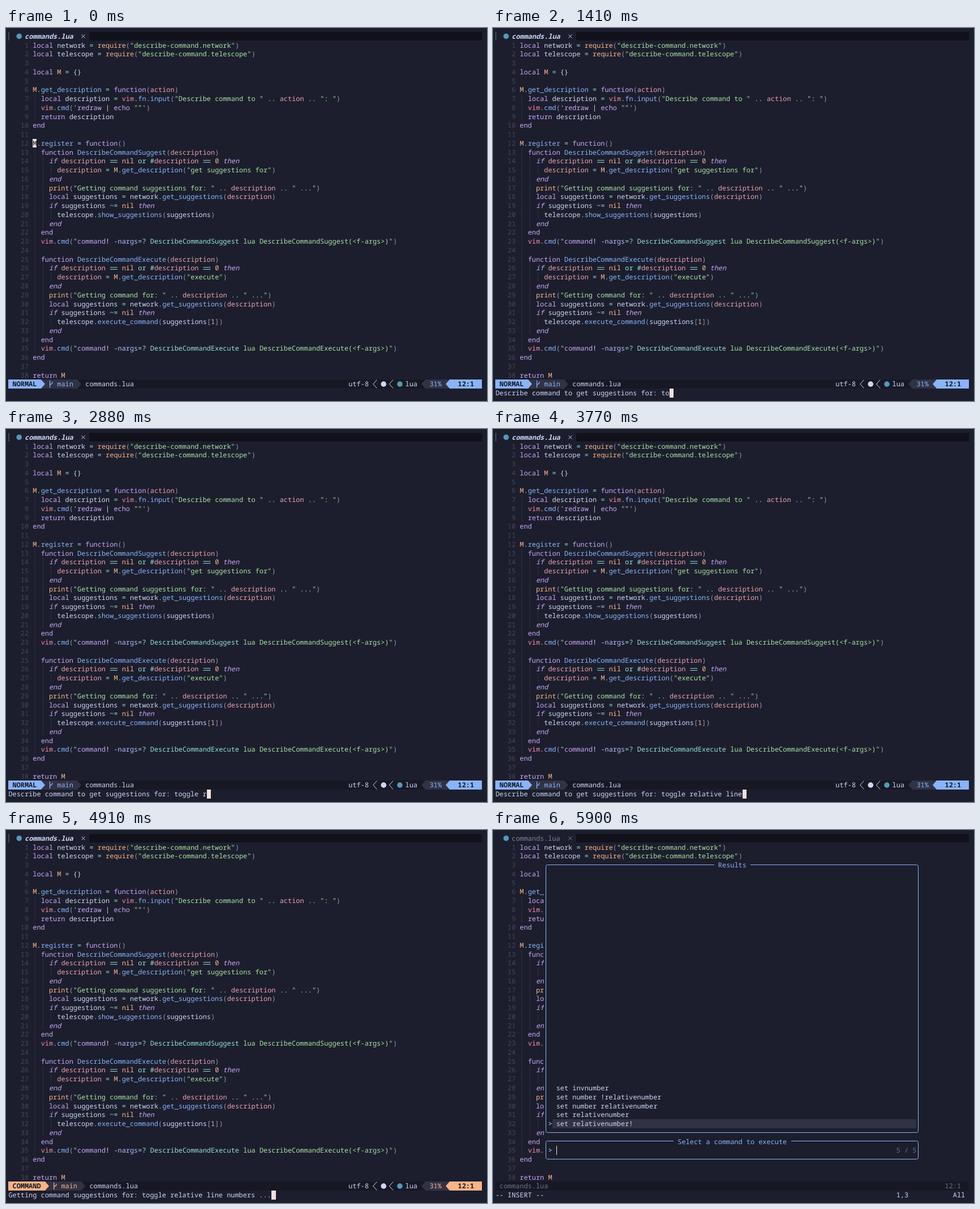
An HTML page for the animation above (8 s loop, 850x659 px).

```html
<!DOCTYPE html>
<html lang="en">
<head>
<meta charset="utf-8">
<title>Describe command</title>
<style>
  html, body { margin: 0; height: 100%; overflow: hidden; background: #1c1e2d; }
  svg { display: block; }
  text { font: 11.923px "Noto Sans Mono", "DejaVu Sans Mono", monospace; white-space: pre; text-rendering: geometricPrecision; }
  .b { font-weight: 600; }
  .i { font-style: italic; }
</style>
</head>
<body>
<svg id="stage" width="850" height="659" viewBox="0 0 850 659"></svg>
<script>
const C = {
  base: '#1c1e2d', mantle: '#181825', crust: '#11111b', surface: '#313244', number: '#45475a',
  dim: '#6c7086', gray: '#7f849c', punct: '#9399b2', text: '#cdd6f4', mauve: '#cba6f7',
  lavender: '#b4befe', blue: '#89b4fa', green: '#a6e3a1', peach: '#fab387', red: '#f38ba8',
  teal: '#94e2d5', maroon: '#eba0ac', cursor: '#f5e0dc', moon: '#519aba'
};
const LOOP = 8000, W = 7.154, H = 15.757, COLS = 117, STATUS = 39, CMD = 40;
const X = col => 4.4 + col * W;
const Y = row => 6.65 + row * H;

const CODE = `local network = require("describe-command.network")
local telescope = require("describe-command.telescope")

local M = {}

M.get_description = function(action)
  local description = vim.fn.input("Describe command to " .. action .. ": ")
  vim.cmd('redraw | echo ""')
  return description
end

M.register = function()
  function DescribeCommandSuggest(description)
    if description == nil or #description == 0 then
      description = M.get_description("get suggestions for")
    end
    print("Getting command suggestions for: " .. description .. " ...")
    local suggestions = network.get_suggestions(description)
    if suggestions ~= nil then
      telescope.show_suggestions(suggestions)
    end
  end
  vim.cmd("command! -nargs=? DescribeCommandSuggest lua DescribeCommandSuggest(<f-args>)")
  
  function DescribeCommandExecute(description)
    if description == nil or #description == 0 then
      description = M.get_description("execute")
    end
    print("Getting command for: " .. description .. " ...")
    local suggestions = network.get_suggestions(description)
    if suggestions ~= nil then
      telescope.execute_command(suggestions[1])
    end
  end
  vim.cmd("command! -nargs=? DescribeCommandExecute lua DescribeCommandExecute(<f-args>)")
end

return M`.split('\n');

const PROMPT = 'Describe command to get suggestions for: ';
const REQUEST = 'toggle relative line numbers';
const WAITING = `Getting command suggestions for: ${REQUEST} ...`;
const RESULTS = ['set invnumber', 'set number !relativenumber', 'set number relativenumber',
  'set relativenumber', 'set relativenumber!'];

// [time, characters typed]
const TYPING = [[740, 0], [1410, 2], [1570, 3], [1730, 5], [1890, 6], [1970, 7], [2880, 8],
  [2960, 10], [3130, 11], [3210, 13], [3370, 14], [3450, 15], [3530, 17], [3690, 19], [3770, 20],
  [3930, 21], [4010, 23], [4170, 24], [4250, 25], [4500, 28]];

const escape = s => s.replace(/&/g, '&amp;').replace(/</g, '&lt;');
const text = (col, row, s, color = C.text, cls = '') =>
  `<text x="${X(col)}" y="${Y(row) + 12.16}" fill="${color}" class="${cls}">${escape(s)}</text>`;
const rect = (x, y, w, h, color) =>
  `<rect x="${x}" y="${y}" width="${w}" height="${h}" fill="${color}"/>`;
const dot = (x, row, color) => `<circle cx="${x}" cy="${Y(row) + 8}" r="4.8" fill="${color}"/>`;
const line = (d, color, width = 1) =>
  `<path d="${d}" fill="none" stroke="${color}" stroke-width="${width}"/>`;

// Cell backgrounds sit on whole pixels
const px = col => Math.round(X(col)), py = row => Math.round(Y(row));
const cells = (col, row, cols, rows, color) =>
  rect(px(col), py(row), px(col + cols) - px(col), py(row + rows) - py(row), color);
const cursor = (col, row) => cells(col, row, 1, 1, C.cursor);

// Solid arrow head filling one status line cell
function arrow(col, color, left) {
  const [from, to] = left ? [px(col + 1), px(col)] : [px(col), px(col + 1)];
  const top = py(STATUS), bottom = py(STATUS + 1);
  return `<path d="M${from} ${top}L${to} ${(top + bottom) / 2}L${from} ${bottom}Z" fill="${color}"/>`;
}

function chevron(col) {
  const y = Y(STATUS);
  return line(`M${X(col + 1)} ${y + 0.5}L${X(col) + 0.5} ${y + H / 2}L${X(col + 1)} ${y + H - 0.5}`, C.text);
}

function tokenColor(token, before, after, row) {
  if (/^["']/.test(token)) return C.green;
  if (/^(local|function|return|end|if|then)$/.test(token)) return C.mauve;
  if (/^(require|print|nil|M|\d)$/.test(token)) return C.peach;
  if (token === 'vim') return C.red;
  if (token === 'action' || token === 'description' && row > 12) return C.maroon;
  if (/^(or|#|=|==|~=|\.\.?)$/.test(token)) return C.teal;
  if (/^[()[\]]$/.test(token)) return C.punct;
  return /\w/.test(token) && (before === '.' || after === '(') ? C.blue : C.text;
}

// Editor commands embedded in a string
function embedded(token, col, row) {
  const parts = /command(?=!)|redraw|echo|[!|]|-nargs|=\?|(?<=\? )\w+|lua .*|["']+/g;
  return [...token.matchAll(parts)].map(({ 0: part, index }) => {
    const color = /^(command|redraw|echo)/.test(part) ? C.mauve
      : /^-nargs/.test(part) ? C.lavender
      : /^[!|]/.test(part) ? C.text
      : /^(=|Describe)/.test(part) ? C.teal : C.green;
    return text(col + index, row, part, color);
  }).join('');
}

function codeLine(source, i) {
  const row = i + 1, indent = source.match(/^ */)[0].length;
  let out = text(row < 10 ? 4 : 3, row, String(row), C.number);
  for (let g = 0; g < indent; g += 2) {
    const x = X(6 + g) + W / 2;
    out += `<path d="M${x} ${Y(row)}v${H}" stroke="${C.number}" stroke-width=".9" stroke-dasharray="2.2 1.74"/>`;
  }
  const tokens = /"[^"]*"|'[^']*'|[A-Za-z_]\w*|\d|[=~]=|\.\.|\{\}|\S/g;
  for (const { 0: token, index } of source.matchAll(tokens)) {
    const col = 6 + index, next = source[index + token.length];
    const color = tokenColor(token, source[index - 1], next, row);
    if (/^("command!|'redraw)/.test(token)) out += embedded(token, col, row);
    else if (token === '==') {
      for (const dy of [6.1, 9.6]) out += rect(X(col) + 0.8, Y(row) + dy, 2 * W - 1.6, 1, color);
    } else {
      const italic = /^(if|then)$/.test(token) || token === 'end' && indent === 4;
      out += text(col, row, token, color, italic ? 'i' : '');
    }
  }
  return out;
}

const code = CODE.map(codeLine).join('');

function tabs(active) {
  const color = active ? C.text : C.gray;
  return cells(20, 0, COLS - 20, 1, C.crust) +
    (active ? rect(px(0), py(0), 2, py(1) - py(0), C.number) : '') +
    dot(23.2, 0, C.moon) +
    text(4, 0, 'commands.lua', color, active ? 'b i' : '') +
    line(`M133.5 ${Y(0) + 5}l6 6m0 -6l-6 6`, color);
}

function status(mode, color) {
  const end = mode.length + 2, y = Y(STATUS), bx = X(end + 2) + 1.6;
  return cells(0, STATUS, COLS, 1, C.mantle) +
    cells(end, STATUS, 9, 1, C.surface) + arrow(end + 9, C.surface) +
    cells(0, STATUS, end, 1, color) + arrow(end, color) +
    text(1, STATUS, mode, C.mantle, 'b') +
    line(`M${bx} ${y + 1.5}v12.5m0 -3.5q0 -2 2 -2.5t2.2 -2.6v-1.6`, color, 1.3) +
    text(end + 4, STATUS, 'main', color) +
    text(end + 11, STATUS, 'commands.lua') +
    text(84, STATUS, 'utf-8') + chevron(90) + dot(667.3, STATUS, C.text) + chevron(94) +
    dot(696, STATUS, C.moon) + text(98, STATUS, 'lua') +
    arrow(102, C.surface, true) + cells(103, STATUS, 6, 1, C.surface) +
    text(104, STATUS, '31%', color) +
    arrow(108, color, true) + cells(109, STATUS, COLS - 109, 1, color) +
    text(111, STATUS, '12:1', C.mantle, 'b');
}

// Thin border through the middle of its cells, on pixel centres
function frame(top, bottom, title, col) {
  const snap = v => Math.floor(v - 0.3) + 0.5;
  const x = snap(X(12.5)), y = snap(Y(top + 0.5));
  const w = snap(X(104.5)) - x, h = snap(Y(bottom + 0.5)) - y;
  return `<rect x="${x}" y="${y}" width="${w}" height="${h}" rx="3" fill="none" stroke="${C.blue}"/>` +
    cells(col - 1, top, title.length + 2, 1, C.base) + text(col, top, title, C.blue);
}

function picker(ready) {
  const out = cells(12, 3, 93, 34, C.base) + frame(3, 33, 'Results', 55) +
    frame(34, 36, 'Select a command to execute', 45);
  if (!ready) return out + cursor(13, 35);
  return out + cells(14, 32, 90, 1, C.surface) + text(13, 32, '>') +
    RESULTS.map((s, i) => text(15, 28 + i, s)).join('') +
    text(13, 35, '>') + rect(px(15), py(35), 1, py(36) - py(35), C.cursor) +
    text(99, 35, '5 / 5', C.dim);
}

function scene(t) {
  if (t < 740) {
    return tabs(true) + code + cursor(6, 12) + text(6, 12, 'M', C.base) +
      (t < 580 ? '' : cells(0, 33, COLS, 6, C.base)) + status('NORMAL', C.blue);
  }
  if (t < 4910) {
    const [, typed] = TYPING.filter(([at]) => at <= t).pop();
    const entry = PROMPT + REQUEST.slice(0, typed);
    return tabs(true) + code + status('NORMAL', C.blue) + text(0, CMD, entry) + cursor(entry.length, CMD);
  }
  if (t < 5820) {
    return tabs(true) + code + status('COMMAND', C.peach) + text(0, CMD, WAITING) + cursor(WAITING.length, CMD);
  }
  if (t < 5900) {
    return tabs(false) + code + picker(false) + status('COMMAND', C.peach) +
      text(0, CMD, WAITING) + text(99, CMD, '1,0-1') + text(106, CMD, 'A');
  }
  return tabs(false) + code + picker(true) + cells(0, STATUS, COLS, 1, C.mantle) +
    text(1, STATUS, 'commands.lua', C.dim) + text(111, STATUS, '12:1', C.dim) +
    text(0, CMD, '-- INSERT --') + text(99, CMD, '1,3') + text(113, CMD, 'All');
}

const stage = document.getElementById('stage');
const CHANGES = [0, 580, ...TYPING.map(([at]) => at), 4910, 5820, 5900];
const start = performance.now();
let shown = -1;
function tick() {
  const t = (performance.now() - start) % LOOP;
  const step = CHANGES.filter(at => at <= t).pop();
  if (step !== shown) {
    stage.innerHTML = scene(step);
    shown = step;
  }
  requestAnimationFrame(tick);
}
tick();
</script>
</body>
</html>
```
